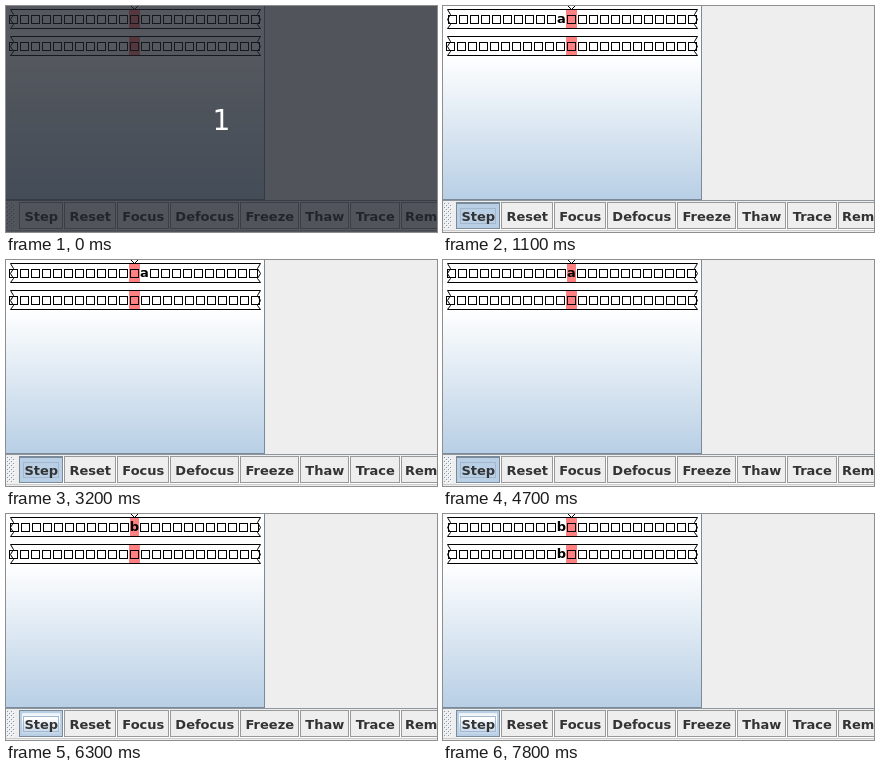
Write an HTML page that moves like this. It is 431 px wide and 226 px high and loops after 8 s.

```html
<!DOCTYPE html>
<html lang="en">
<head>
<meta charset="utf-8">
<title>Two-tape machine stepping</title>
<style>
  html, body { margin: 0; width: 431px; height: 226px; overflow: hidden; background: #eee; }
  svg { display: block; }
  text { font: bold 13px "DejaVu Sans", sans-serif; }
  .crisp { shape-rendering: crispEdges; }
  #count { font: 28px "DejaVu Sans", sans-serif; }
</style>
</head>
<body>
<svg id="stage" width="431" height="226" viewBox="0 0 431 226">
  <defs>
    <linearGradient id="sky" gradientUnits="userSpaceOnUse" x1="0" y1="50" x2="0" y2="193">
      <stop offset="0" stop-color="#fff"/><stop offset="1" stop-color="#b8cfe5"/>
    </linearGradient>
    <linearGradient id="hover" x1="0" y1="0" x2="0" y2="1">
      <stop offset="0" stop-color="#dde8f3"/><stop offset=".3" stop-color="#fff"/>
      <stop offset=".6" stop-color="#dde8f3"/><stop offset="1" stop-color="#b8cfe5"/>
    </linearGradient>
    <pattern id="bumps" width="4" height="4" patternUnits="userSpaceOnUse">
      <path d="M0 0h1v1h-1zM2 2h1v1h-1z" fill="#fff"/>
      <path d="M1 1h1v1h-1zM3 3h1v1h-1z" fill="#7f9ab8"/>
    </pattern>
  </defs>
  <g class="crisp">
    <rect width="258" height="193" fill="url(#sky)"/>
    <path d="M258.5 0V193.5H0" fill="none" stroke="#7a8a99"/>
    <path d="M0 194.5H431" stroke="#8e979f"/>
    <path d="M0 224.5H431" stroke="#ccc"/>
    <rect x="1" y="197" width="8" height="26" fill="url(#bumps)"/>
  </g>
  <g id="tapes"></g>
  <path d="M125 0L128.5 3.5L132 0" fill="none" stroke="#000"/>
  <g id="bar"></g>
  <g id="dim">
    <rect width="431" height="226" fill="#1c2028" fill-opacity=".75"/>
    <text id="count" x="215.5" y="124" text-anchor="middle" fill="#fff">1</text>
  </g>
</svg>
<script>
const LOOP = 8000, HOVER_AT = 200;
const $ = id => document.getElementById(id);

function add(parent, tag, attrs, text) {
  const el = document.createElementNS("http://www.w3.org/2000/svg", tag);
  for (const k in attrs) el.setAttribute(k, attrs[k]);
  if (text) el.textContent = text;
  return parent.appendChild(el);
}

// press time, release time, head move on tape 1, symbol written first
const STEPS = [
  [600, 700, 1, "a"], [1100, 1200, -1], [1700, 1800, 1], [2100, 2200, -1],
  [2700, 2800, -1], [3200, 3400, 1], [3700, 3800, 1], [4200, 4400, -1],
  [4700, 4900, -1], [5200, 5300, 1], [5700, 5900, 1, "b"], [6200, 6300, -1],
  [6700, 6900, -1], [7200, 7300, 1], [7700, 7800, 1]
];

// Tape states after each step; the symbol sits at an offset from the head.
const states = [{ symbol: "", at: 0, copied: false }];
STEPS.forEach(([, , move, write], i) => {
  const s = states[i];
  states.push({ symbol: write || s.symbol, at: s.at - move, copied: i === STEPS.length - 1 });
});

const BLANK_W = 11, SYMBOL_W = 9, REACH = 11;

function drawTape(top, symbol, at) {
  const g = add($("tapes"), "g", {});
  const width = i => symbol && i === at ? SYMBOL_W : BLANK_W;
  const y = top + 0.5;
  const torn = (x, d) => [0, 5, 10, 15, 19].map((dy, i) => `${x + (i % 2) * d},${y + dy}`);
  const outline = [...torn(4.5, 3), ...torn(254.5, -3).reverse()].join(" ");
  add(g, "polygon", { points: outline, fill: "#fff", stroke: "#000" });

  const headW = width(0), headX = 128 - (headW >> 1);
  add(g, "rect", { x: headX, y: top + 4 - 3, width: headW, height: 18, fill: "#ff8080", class: "crisp" });

  const cell = (i, x) => {
    if (symbol && i === at) {
      add(g, "text", { x: x + SYMBOL_W / 2, y: top + 14, "text-anchor": "middle" }, symbol);
    } else {
      add(g, "rect", { x: x + 1.5, y: y + 6, width: 8, height: 8, fill: "none", stroke: "#000", class: "crisp" });
    }
  };
  let x = headX;
  for (let i = 0; i <= REACH; i++) { cell(i, x); x += width(i); }
  x = headX;
  for (let i = -1; i >= -REACH; i--) { x -= width(i); cell(i, x); }
}

const BUTTONS = [
  ["Step", 13, 45], ["Reset", 58, 53], ["Focus", 111, 53], ["Defocus", 164, 70],
  ["Freeze", 234, 60], ["Thaw", 294, 50], ["Trace", 344, 51], ["Remove", 395, 67]
];

function drawButton(label, x, w, look, focused) {
  const g = add($("bar"), "g", {});
  const box = add(g, "g", { class: "crisp" });
  const fill = { flat: "#eee", hover: "url(#hover)", pressed: "#b8cfe5" }[look];
  add(box, "rect", { x: x + 1, y: 197, width: w - 1, height: 27, fill: "#fff" });
  add(box, "rect", {
    x: x + 0.5, y: 196.5, width: w - 2, height: 26, fill,
    stroke: look === "flat" ? "#999" : "#7a8a99"
  });
  if (look === "pressed") add(box, "path", { d: `M${x + 1} 197.5H${x + w - 2}`, stroke: "#7a8a99" });
  if (look === "hover") {
    add(box, "rect", { x: x + 2, y: 198, width: w - 5, height: 23, fill: "none", stroke: "#b8cfe5", "stroke-width": 2 });
  }
  if (focused) {
    add(box, "rect", { x: x + 4.5, y: 202.5, width: w - 10, height: 15, fill: "none", stroke: "#a3b8cc" });
  }
  add(g, "text", { x: x + w / 2 - 0.2, y: 215, "text-anchor": "middle", fill: "#333" }, label);
}

let shown = "";
function render(t) {
  const done = STEPS.filter(s => t >= s[1]).length;
  const pressed = STEPS.some(s => t >= s[0] && t < s[1]);
  const look = pressed ? "pressed" : t >= HOVER_AT ? "hover" : "flat";
  const key = [done, look, t < 100].join();
  if (key === shown) return;
  shown = key;

  const s = states[done];
  $("tapes").replaceChildren();
  drawTape(3, s.symbol, s.at);
  drawTape(30, s.copied ? "b" : "", -1);

  $("bar").replaceChildren();
  BUTTONS.forEach(([label, x, w], i) =>
    drawButton(label, x, w, i ? "flat" : look, !i && t >= STEPS[0][0]));
  $("dim").style.display = t < 100 ? "" : "none";
}

const start = performance.now();
function tick() {
  render((performance.now() - start) % LOOP);
  requestAnimationFrame(tick);
}
tick();
</script>
</body>
</html>
```
